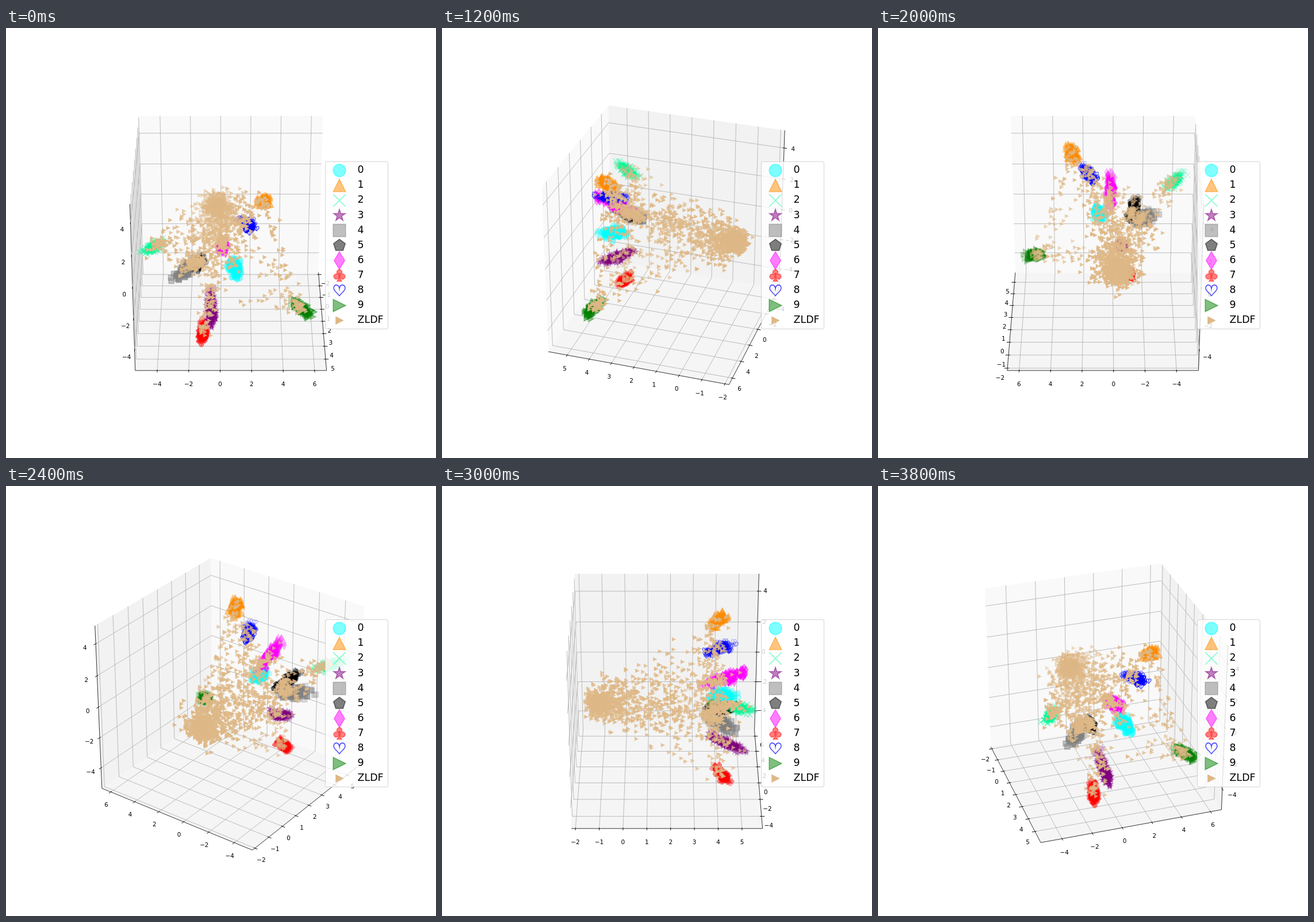
An HTML page with a canvas that plays this animation: 748x748 px, repeating every 4000 ms.

```html
<!DOCTYPE html>
<html>
<head>
<meta charset="utf-8">
<style>
html, body { margin: 0; width: 100%; height: 100%; overflow: hidden; background: #fff; }
canvas { display: block; width: 748px; height: 748px; }
</style>
</head>
<body>
<canvas id="stage" width="748" height="748"></canvas>
<script>
const ctx = document.getElementById('stage').getContext('2d');
const FONT = '"DejaVu Sans", Verdana, sans-serif';
const STEP_MS = 200, STEPS = 20;
const ELEV = Math.PI / 6, COS_E = Math.cos(ELEV), SIN_E = Math.sin(ELEV);
const EDGE = 0.5 + 1 / 48;   // half width of the drawn box
const DELTA = 1 / 12, PAD = 0.0413;

// Each axis: data centre, data range, ticks, tick direction, axis flipped to the front
const AXES = [
  { mid: 1.843, span: 7.72, ticks: [-2, -1, 0, 1, 2, 3, 4, 5], dir: 1, front: 1, pane: '249,249,249' },
  { mid: 0.679, span: 11.67, ticks: [-4, -2, 0, 2, 4, 6], dir: 0, front: 0, pane: '242,242,242' },
  { mid: -0.132, span: 10.08, ticks: [-4, -2, 0, 2, 4], dir: 0, front: 0, pane: '245,245,245' }
];

// Each group is a soft cigar between points a and b in box units
const GROUPS = [
  { shape: 'circle', rgb: '0,255,255', a: [.365, .035, 0], b: [.245, .005, .02], sd: .016 },
  { shape: 'up', rgb: '255,140,0', a: [.315, .185, .43], b: [.255, .16, .385], sd: .014 },
  { shape: 'cross', rgb: '0,250,154', a: [.45, -.455, .19], b: [.3, -.36, .17], sd: .012 },
  { shape: 'star', rgb: '128,0,128', a: [.44, -.105, -.285], b: [.235, -.11, -.172], sd: .012 },
  { shape: 'square', rgb: '128,128,128', a: [.37, -.295, -.028], b: [.215, -.195, 0], sd: .014 },
  { shape: 'pentagon', rgb: '0,0,0', a: [.4, -.195, .06], b: [.22, -.155, .015], sd: .011 },
  { shape: 'diamond', rgb: '255,0,255', a: [.43, -.04, .19], b: [.2, -.045, .115], sd: .012 },
  { shape: 'club', rgb: '255,0,0', a: [.34, -.157, -.44], b: [.275, -.148, -.365], sd: .011 },
  { shape: 'heart', rgb: '0,0,255', a: [.36, .12, .282], b: [.225, .05, .258], sd: .012 },
  { shape: 'right', rgb: '0,128,0', a: [.315, .435, -.292], b: [.265, .345, -.23], sd: .012 }
];
const CLOUD = { shape: 'right', rgb: '222,184,135', points: [] };

let seed = 20117;
function rnd() {
  seed = (seed + 0x6D2B79F5) | 0;
  let t = Math.imul(seed ^ (seed >>> 15), 1 | seed);
  t = (t + Math.imul(t ^ (t >>> 7), 61 | t)) ^ t;
  return ((t ^ (t >>> 14)) >>> 0) / 4294967296;
}
const gauss = () => Math.sqrt(-2 * Math.log(1 - rnd())) * Math.cos(2 * Math.PI * rnd());
const clamp = (v, lo, hi) => Math.min(hi, Math.max(lo, v));
const lerp = (a, b, u) => a.map((v, i) => v + (b[i] - v) * u);
const jitter = (p, sd) => p.map(v => v + clamp(gauss(), -2.4, 2.4) * sd);
const along = (g, mid) => lerp(g.a, g.b, clamp(mid + .22 * gauss(), 0, 1.05));
const pick = s => GROUPS[+s[Math.floor(rnd() * s.length)]];

function fillPoints() {
  for (const g of GROUPS) {
    g.points = Array.from({ length: 180 }, () => jitter(along(g, .5), g.sd));
  }
  const heart = [-.375, -.08, .016], out = CLOUD.points;
  for (let i = 0; i < 420; i++) out.push(jitter(heart, .03));
  for (let i = 0; i < 170; i++) out.push(jitter([-.31, -.06, .02], .055));
  const toward = '0011223344455556667788899';
  for (let i = 0; i < 530; i++) {
    out.push(jitter(lerp(jitter(heart, .05), along(pick(toward), .8), .05 + .92 * rnd()), .04));
  }
  const members = '01223344455566667899';
  for (let i = 0; i < 300; i++) {
    const g = pick(members);
    out.push(jitter(along(g, .72), g.sd * 1.2));
  }
  const links = ['19', '19', '89', '24', '26', '37', '36', '08', '45', '39', '18'];
  for (let i = 0; i < 190; i++) {
    const [m, n] = links[Math.floor(rnd() * links.length)];
    out.push(jitter(lerp(along(GROUPS[m], .8), along(GROUPS[n], .8), rnd()), .024));
  }
  for (const p of out) p[0] = Math.max(p[0], -.456 + .02 * rnd());
}

let cosA = 1, sinA = 0;
function project([x, y, z]) {
  const f = x * cosA + y * sinA, r = y * cosA - x * sinA;
  const depth = 10 - f * COS_E - z * SIN_E;
  return [391.2 + 3133.5 * r / depth, 370 - 3113.5 * (z * COS_E - f * SIN_E) / depth, depth];
}

function poly(pts, close) {
  ctx.beginPath();
  pts.forEach(([x, y], i) => i ? ctx.lineTo(x, y) : ctx.moveTo(x, y));
  if (close) ctx.closePath();
}
function line(pts, color, width) {
  poly(pts.map(project));
  ctx.strokeStyle = color;
  ctx.lineWidth = width;
  ctx.stroke();
}
const ring = (x, y, n, rOut, rIn) => Array.from({ length: n }, (_, i) => {
  const a = -Math.PI / 2 + i * 2 * Math.PI / n, r = i % 2 ? rIn : rOut;
  return [x + r * Math.cos(a), y + r * Math.sin(a)];
});

const SHAPES = {
  circle(x, y, r) { ctx.beginPath(); ctx.arc(x, y, r, 0, 7); },
  up(x, y, r) { poly([[x, y - r], [x - r, y + r], [x + r, y + r]], true); },
  right(x, y, r) { poly([[x + r, y], [x - r, y - r], [x - r, y + r]], true); },
  square(x, y, r) { poly([[x - r, y - r], [x + r, y - r], [x + r, y + r], [x - r, y + r]], true); },
  diamond(x, y, r) {
    const h = r * 1.414, w = h * .6;
    poly([[x, y - h], [x + w, y], [x, y + h], [x - w, y]], true);
  },
  star(x, y, r) { poly(ring(x, y, 10, r, r * .382), true); },
  pentagon(x, y, r) { poly(ring(x, y, 5, r, r), true); },
  cross(x, y, r) {
    ctx.beginPath();
    ctx.moveTo(x - r, y - r); ctx.lineTo(x + r, y + r);
    ctx.moveTo(x - r, y + r); ctx.lineTo(x + r, y - r);
  },
  heart(x, y, r) {
    ctx.beginPath();
    ctx.moveTo(x, y + r * .88);
    ctx.bezierCurveTo(x - r * .3, y + r * .35, x - r * .95, y + r * .1, x - r * .92, y - r * .4);
    ctx.bezierCurveTo(x - r * .85, y - r * 1.05, x - r * .1, y - r * 1.05, x, y - r * .3);
    ctx.bezierCurveTo(x + r * .1, y - r * 1.05, x + r * .85, y - r * 1.05, x + r * .92, y - r * .4);
    ctx.bezierCurveTo(x + r * .95, y + r * .1, x + r * .3, y + r * .35, x, y + r * .88);
  },
  club(x, y, r) {
    const q = r * .42;
    ctx.beginPath();
    for (const [dx, dy] of [[0, -.52], [-.5, .17], [.5, .17]]) {
      ctx.moveTo(x + dx * r + q, y + dy * r);
      ctx.arc(x + dx * r, y + dy * r, q, 0, 2 * Math.PI);
    }
    ctx.moveTo(x - r * .1, y - r * .3);
    ctx.lineTo(x + r * .1, y - r * .3);
    ctx.lineTo(x + r * .1, y + r * .55);
    ctx.lineTo(x + r * .38, y + r * .92);
    ctx.lineTo(x - r * .38, y + r * .92);
    ctx.lineTo(x - r * .1, y + r * .55);
    ctx.closePath();
  }
};

function marker(shape, x, y, r, rgb, alpha) {
  const open = shape === 'cross' || shape === 'heart';
  if (shape === 'heart') alpha = Math.min(1, alpha * 1.4);
  ctx.fillStyle = ctx.strokeStyle = `rgba(${rgb},${alpha})`;
  ctx.lineWidth = 1.56;
  SHAPES[shape](x, y, r);
  if (!open) ctx.fill();
  ctx.stroke();
}

function drawAxes() {
  const back = [cosA < -1e-9 ? EDGE : -EDGE, sinA < -1e-9 ? EDGE : -EDGE, -EDGE];
  const withAt = (p, i, v) => { const q = p.slice(); q[i] = v; return q; };

  AXES.forEach((axis, i) => {
    const [j, k] = [(i + 1) % 3, (i + 2) % 3];
    const corners = [[-1, -1], [1, -1], [1, 1], [-1, 1]].map(([u, v]) =>
      project(withAt(withAt(back, j, u * EDGE), k, v * EDGE)));
    poly(corners, true);
    ctx.fillStyle = `rgb(${axis.pane})`;
    ctx.fill();
  });

  ctx.font = `10.39px ${FONT}`;
  ctx.textAlign = 'center';
  AXES.forEach((axis, i) => {
    const [j, k] = [(i + 1) % 3, (i + 2) % 3];
    const edge = withAt(back, axis.front, -back[axis.front]);
    line([withAt(edge, i, -EDGE), withAt(edge, i, EDGE)], '#000', .8);
    const spots = axis.ticks.map(v => (v - axis.mid) / axis.span);
    for (const s of spots) {
      const p = withAt(back, i, s);
      line([withAt(p, j, -p[j]), p, withAt(p, k, -p[k])], '#b0b0b0', .85);
    }
    spots.forEach((s, n) => {
      const p = withAt(edge, i, s), d = axis.dir;
      const sign = Math.sign(back[d]);
      line([withAt(p, d, p[d] + .1 * sign * DELTA), withAt(p, d, p[d] - .2 * sign * DELTA)], '#000', .95);
      const at = p.map((v, m) => m === i ? v : v + Math.sign(v) * PAD);
      const [x, y] = project(at);
      ctx.fillStyle = '#000';
      ctx.fillText(String(axis.ticks[n]).replace('-', '\u2212'), x, y + 9);
    });
  });
}

function drawGroup(g, spots, r, base) {
  let near = Infinity, far = -Infinity;
  for (const s of spots) {
    near = Math.min(near, s[2]);
    far = Math.max(far, s[2]);
  }
  for (const [x, y, depth] of spots) {
    marker(g.shape, x, y, r, g.rgb, base * (1 - .7 * (depth - near) / (far - near)));
  }
}

function drawPoints() {
  const nearest = o => Math.min(...o.spots.map(s => s[2]));
  GROUPS.map(g => ({ g, spots: g.points.map(project) }))
    .sort((a, b) => nearest(b) - nearest(a))
    .forEach(o => drawGroup(o.g, o.spots, 4.6, .5));
  drawGroup(CLOUD, CLOUD.points.map(project), 2.5, 1);
}

function drawLegend() {
  ctx.beginPath();
  ctx.roundRect(555.5, 232.5, 109, 291, 3.5);
  ctx.fillStyle = 'rgba(255,255,255,.8)';
  ctx.strokeStyle = 'rgba(204,204,204,.8)';
  ctx.lineWidth = 1.04;
  ctx.fill();
  ctx.stroke();
  ctx.font = `17.4px ${FONT}`;
  ctx.textAlign = 'left';
  [...GROUPS, CLOUD].forEach((g, i) => {
    const y = 247.8 + 26.1 * i, cloud = g === CLOUD;
    marker(g.shape, 580, y, cloud ? 6 : 10.8, g.rgb, cloud ? 1 : .5);
    ctx.fillStyle = '#000';
    ctx.fillText(cloud ? 'ZLDF' : String(i), 611.6, 252.2 + 26.1 * i);
  });
}

function draw(step) {
  const azim = step * 2 * Math.PI / STEPS;
  cosA = Math.cos(azim);
  sinA = Math.sin(azim);
  ctx.fillStyle = '#fff';
  ctx.fillRect(0, 0, 748, 748);
  drawAxes();
  drawPoints();
  drawLegend();
}

let shown = -1;
const start = performance.now();
function tick() {
  const step = Math.floor((performance.now() - start) / STEP_MS) % STEPS;
  if (step !== shown) draw(shown = step);
  requestAnimationFrame(tick);
}
fillPoints();
tick();
</script>
</body>
</html>
```
